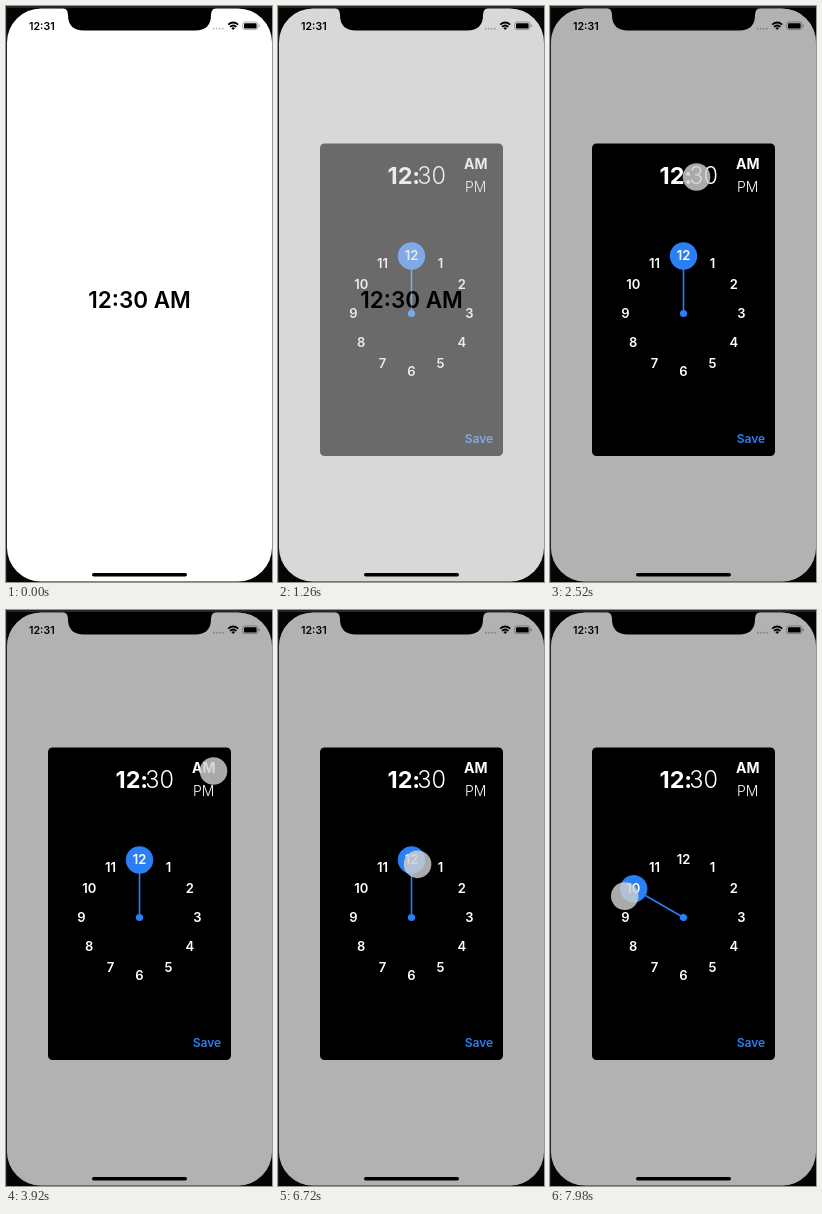
Recreate the animation shown at these times as an HTML page. Size 266 px wide and 576 px high, loop 8 s.

```html
<!DOCTYPE html>
<html lang="en">
<head>
<meta charset="utf-8">
<title>Time picker</title>
<style>
html, body { margin: 0; width: 100%; height: 100%; overflow: hidden; background: #000; }
svg { display: block; width: 266px; height: 576px; }
text { font-family: Inter, Roboto, sans-serif; }
.mid { text-anchor: middle; }
#picker text { fill: #fff; }
#picker .save { fill: #2a7ff5; }
</style>
</head>
<body>
<svg viewBox="0 0 266 576" xmlns="http://www.w3.org/2000/svg">
  <rect width="266" height="576" fill="#050505"/>
  <rect width="266" height="2" fill="#262626"/>
  <rect width="1" height="576" fill="#222"/>
  <rect x="1" y="2.5" width="265" height="573" rx="34" fill="#fff" id="screen"/>
  <text class="mid" x="133.5" y="302" font-size="22.5" font-weight="600">12:30 AM</text>
  <rect x="1" y="2.5" width="265" height="573" rx="34" id="dim"/>

  <path d="M57 2 Q62 3 62 9 Q62 24.500 78 24.500 H189 Q205 24.500 205 9 Q205 3 210 2 Z"/>
  <text x="23" y="23.700" font-size="10.6" font-weight="600">12:31</text>
  <g fill="#000" fill-opacity=".28">
    <circle cx="207.700" cy="22.700" r=".9"/><circle cx="210.700" cy="22.700" r=".9"/>
    <circle cx="213.700" cy="22.700" r=".9"/><circle cx="216.700" cy="22.700" r=".9"/>
  </g>
  <g fill="none" stroke="#000" stroke-width="1.7">
    <path d="M222.200 18.700 Q227.200 14.300 232.200 18.700"/>
    <path d="M224 20.900 Q227.200 18.100 230.400 20.900"/>
  </g>
  <path d="M225.300 22 Q227.200 20.500 229.100 22 L227.200 24 Z"/>
  <rect x="236.700" y="16" width="15.200" height="7.600" rx="2.300" fill="none" stroke="#000" stroke-opacity=".4" stroke-width=".8"/>
  <rect x="238" y="17.200" width="12.600" height="5.200" rx="1.200"/>
  <rect x="252.700" y="18.500" width="1" height="2.600" rx=".5" fill-opacity=".4"/>
  <rect x="86" y="567" width="95" height="3.500" rx="1.750"/>

  <g id="picker">
    <rect x="42" y="137.500" width="183" height="312.500" rx="4.500"/>
    <text id="hour" x="134.500" y="177.500" font-size="23.5" text-anchor="end">12</text>
    <text x="134.200" y="177.500" font-size="23.5" font-weight="700">:</text>
    <text id="minute" x="168" y="177.500" font-size="23.5" text-anchor="end">30</text>
    <text id="am" class="mid" x="197.700" y="162.500" font-size="14">AM</text>
    <text id="pm" class="mid" x="197.700" y="186" font-size="14">PM</text>
    <g id="hand" fill="#2a7ff5">
      <rect x="132.700" y="250" width="1.600" height="57.500"/>
      <circle cx="133.500" cy="250" r="13.700"/>
      <circle cx="133.500" cy="307.500" r="3.600"/>
    </g>
    <g id="dial" font-size="13" font-weight="600"></g>
    <text class="save mid" x="201" y="437" font-size="12" font-weight="600">Save</text>
  </g>
  <circle id="touch" r="13.800" fill="#d0d0d0" fill-opacity=".82"/>
</svg>
<script>
const LOOP = 8000, STEP = 70, CX = 133.5, CY = 307.5, R = 58;
const $ = id => document.getElementById(id);
const clamp = v => Math.max(0, Math.min(1, v));
const within = (t, a, b) => t >= a && t < b;
const mix = (a, b, p) => a + (b - a) * p;

function polar(deg, r) {
  const a = deg * Math.PI / 180;
  return [CX + r * Math.sin(a), CY - r * Math.cos(a)];
}

const marks = Array.from({ length: 12 }, (_, i) => {
  const el = document.createElementNS("http://www.w3.org/2000/svg", "text");
  const [x, y] = polar(i * 30, R);
  el.setAttribute("x", x.toFixed(2));
  el.setAttribute("y", (y + 4.7).toFixed(2));
  el.setAttribute("class", "mid");
  $("dial").append(el);
  return el;
});

// start, end, x, y
const taps = [
  [2520, 2660, 146.5, 171],
  [3080, 3220, 122, 171],
  [3920, 4060, 207.5, 161],
  [4340, 4550, 206, 180],
  [5040, 5110, 207.5, 160.5]
];
const DRAG = 6720, DRAG_TIME = 1260;

function weight(id, bold) {
  $(id).setAttribute("font-weight", bold ? 700 : 300);
}

function draw(now) {
  const t = Math.floor(now % LOOP / STEP) * STEP;

  const k = clamp((t - 1058) / 400);
  const shown = k * k * (3 - 2 * k);
  $("dim").setAttribute("opacity", 0.3 * shown);
  $("picker").setAttribute("opacity", shown);

  const minutes = within(t, 2660, 3220);
  weight("hour", !minutes);
  weight("minute", minutes);
  marks.forEach((el, i) => {
    el.textContent = minutes ? String(i * 5).padStart(2, "0") : i || 12;
  });

  const pm = within(t, 4480, 5110);
  weight("am", !pm);
  weight("pm", pm);

  let angle = minutes ? 180 : 0;
  let spot = null;
  const tap = taps.find(([a, b]) => within(t, a, b));
  if (tap) spot = tap.slice(2);
  if (t >= DRAG) {
    const p = clamp((t - DRAG) / DRAG_TIME);
    const finger = mix(6.5, 290, Math.pow(p, 1.15));
    spot = polar(finger, mix(53.5, 62.5, p));
    angle = Math.round(finger / 30) * 30;
  }
  $("hand").setAttribute("transform", `rotate(${angle} ${CX} ${CY})`);

  $("touch").setAttribute("visibility", spot ? "visible" : "hidden");
  if (spot) {
    $("touch").setAttribute("cx", spot[0]);
    $("touch").setAttribute("cy", spot[1]);
  }
}

const start = performance.now();
function tick() {
  draw(performance.now() - start);
  requestAnimationFrame(tick);
}
tick();
</script>
</body>
</html>
```
